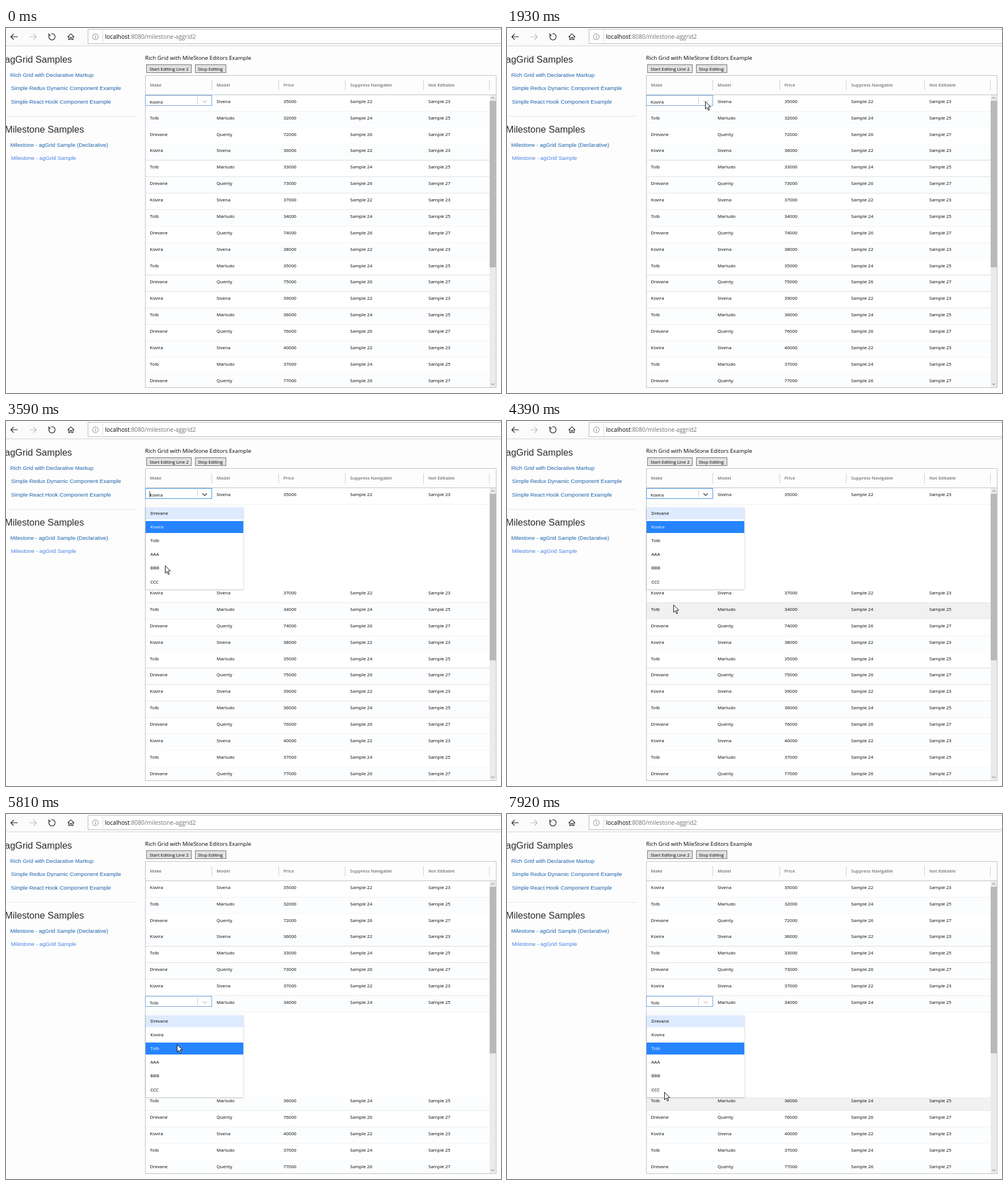
An HTML page with a canvas for the animation above (8 s loop, 872 by 642 pixels).

```html
<!DOCTYPE html>
<html lang="en">
<head>
<meta charset="utf-8">
<title>Rich Grid</title>
<style>
html, body { margin: 0; width: 100%; height: 100%; overflow: hidden; background: #fdfdfd; }
canvas { display: block; }
</style>
</head>
<body>
<canvas id="stage" width="872" height="642"></canvas>
<script>
const ctx = document.getElementById('stage').getContext('2d');
const SANS = '"Open Sans", "Noto Sans", sans-serif';
const ARIAL = '"Liberation Sans", Arial, sans-serif';
const LOOP = 8000, ROW_TOP = 117.5, ROW_H = 28.86, ROWS = 18;
const LEFT = 245, WIDTH = 607, BOTTOM = 632;

const COLUMNS = ['Make', 'Model', 'Price', 'Suppress Navigable', 'Not Editable'];
const CARS = [['Kovira', 'Sivena', 35], ['Tolb', 'Marludo', 32], ['Drevane', 'Quenty', 72]];
const OPTIONS = ['Drevane', 'Kovira', 'Tolb', 'AAA', 'BBB', 'CCC'];

// Pointer moves: start, end, target x and y
const START = [517, 557];
const MOVES = [
  [230, 610, 392, 196], [1000, 1300, 346, 180], [1300, 1850, 349, 129],
  [2480, 3270, 280, 254], [3700, 4090, 285, 270], [4090, 4240, 293, 323],
  [5180, 6040, 304, 435], [6110, 6500, 333, 412], [6500, 6900, 292, 491],
  [6950, 7300, 387, 394], [7300, 7690, 285, 493], [7800, 7900, 277, 489]
];
const OPEN = 2170, SELECT = 4470, EDIT = 4900;
const CLICKS = [2080, SELECT, 4760];
const ARROW = new Path2D('M0 0V13L3 10.3 5.2 15.3 7.2 14.5 5 9.5 9 9.2Z');
const HOME = new Path2D('M108.5 16l5.8-5.8 5.8 5.8M110.5 14.5v6h2.5v-4h2.5v4h2.5v-6');

const rowY = i => ROW_TOP + i * ROW_H;
const columnX = i => i < 4 ? 253.5 + 117.6 * i : 744;

function rect(x, y, w, h, fill) {
  ctx.fillStyle = fill;
  ctx.fillRect(x, y, w, h);
}
function box(x, y, w, h, color, fill) {
  if (fill) rect(x, y, w, h, fill);
  ctx.strokeStyle = color;
  ctx.lineWidth = 1;
  ctx.strokeRect(x + .5, y + .5, w - 1, h - 1);
}
function text(s, x, y, size = 8, color = '#000', font = SANS, weight = 400) {
  ctx.font = `${weight} ${size}px ${font}`;
  ctx.fillStyle = color;
  ctx.fillText(s, x, y);
  return x + ctx.measureText(s).width;
}
function stroke(path, color, width = 1) {
  ctx.strokeStyle = color;
  ctx.lineWidth = width;
  ctx.stroke(typeof path === 'string' ? new Path2D(path) : path);
}
function arc(x, y, r, from = 0, to = 2 * Math.PI) {
  const path = new Path2D();
  path.arc(x, y, r, from, to);
  return path;
}
function chevron(x, y, w, h, color, width = 1) {
  stroke(`M${x - w} ${y - h}l${w} ${2 * h} ${w} ${-2 * h}`, color, width);
}
// Toolbar arrow with its tip at x, pointing along dir
function arrow(x, dir, color) {
  stroke(`M${x - 12 * dir} 15.5H${x}m${-5 * dir} -5l${5 * dir} 5 ${-5 * dir} 5`, color, 1.2);
}

function toolbar() {
  rect(0, 0, 872, 31, '#fbfbfb');
  rect(0, 31, 872, 1, '#d2d2d2');
  box(144, 2, 740, 26, '#bcbcbc', '#fff');
  arrow(8.5, -1, '#222');
  arrow(53.5, 1, '#bbb');
  stroke(arc(81, 15.5, 5.5, -1.8, 3.9), '#222', 1.2);
  stroke('M75.5 9.5v3h3.5', '#222', 1.2);
  stroke(HOME, '#222', 1.1);
  stroke(arc(157.5, 15.5, 5), '#888');
  stroke('M157.5 12.5v1m0 1v4', '#888');
  rect(170, 4, 1, 22, '#dcdcdc');
  const end = text('localhost', 174.5, 19, 10.3);
  text(':8080/milestone-aggrid2', end, 19, 10.3, '#707070');
}

function sidebar() {
  const title = (s, y) => text(s, -2, y, 16.5, '#2b2b2b', ARIAL);
  const link = (s, x, y, color = '#1a62ab') => text(s, x, y, 9.7, color, ARIAL);
  title('agGrid Samples', 61);
  link('Rich Grid with Declarative Markup', 7.6, 86);
  link('Simple Redux Dynamic Component Example', 8.8, 109);
  link('Simple React Hook Component Example', 8.8, 133);
  rect(0, 155, 228, 1, '#e6e6e6');
  title('Milestone Samples', 184);
  link('Milestone - agGrid Sample (Declarative)', 7.6, 209);
  link('Milestone - agGrid Sample', 8.8, 232, '#4682e6');
}

function header() {
  text('Rich Grid with MileStone Editors Example', LEFT, 56, 9.75);
  box(247, 64, 80, 15, '#777', '#e1e1e1');
  text('Start Editing Line 2', 253, 75, 7.9);
  box(333, 64, 55, 15, '#777', '#e1e1e1');
  text('Stop Editing', 338, 75, 7.9);
  COLUMNS.forEach((s, i) => {
    text(s, columnX(i), 103, 7.8, '#707070', SANS, 600);
    rect(i < 4 ? Math.round(columnX(i + 1) - 9) : 851, 92, 1, 18, '#d0d0d0');
  });
}

function rows(hover, editing) {
  ctx.save();
  ctx.beginPath();
  ctx.rect(LEFT, 117, WIDTH, BOTTOM - 117);
  ctx.clip();
  for (let i = 0; i < ROWS; i++) {
    const y = rowY(i), k = i % 3, [make, model, price] = CARS[k];
    rect(LEFT, y, WIDTH, ROW_H, i === hover ? '#f1f1f1' : i % 2 ? '#fcfdfe' : '#fff');
    rect(LEFT, Math.floor(y + ROW_H), WIDTH, 1, '#d5d7d9');
    [i === editing ? '' : make, model, (price + Math.floor(i / 3)) * 1000,
      `Sample ${22 + 2 * k}`, `Sample ${23 + 2 * k}`]
      .forEach((s, c) => text(s, columnX(c), y + 14.4));
  }
  ctx.restore();
}

function frame() {
  rect(852, 117, 11, 515, '#ebebeb');
  rect(852, 128, 11, 293, '#b9b9b9');
  chevron(857.5, 123, 3, -1.5, '#666');
  chevron(857.5, 626.5, 3, 1.5, '#666');
  box(LEFT, 83, 619, 550, '#bdc3c7');
  rect(LEFT, 117, 618, 1, '#bdc3c7');
}

function editor(row, active, caret) {
  const y = Math.round(rowY(row));
  box(LEFT, y, 118, 19, active ? '#4793e6' : '#72a5d9', '#fff');
  rect(337, y + 3, 1, 13, '#ccc');
  chevron(350, y + 11.3, 3.8, 1.9, active ? '#555' : '#c4c4c4', active ? 1.6 : 1.2);
  text(CARS[row % 3][0], 253, y + 14.5);
  if (caret) rect(253, y + 6, 1, 10, '#222');
}

function menu(row) {
  const top = Math.round(rowY(row) + 33.3), under = Math.floor(rowY(row + 1)) + 1;
  rect(LEFT + 1, under, WIDTH - 1, top + 145 - under, '#fff');
  ctx.save();
  ctx.shadowColor = 'rgba(0,0,0,.25)';
  ctx.shadowBlur = 3;
  ctx.shadowOffsetY = 1;
  rect(246, top, 172, 145, '#fff');
  ctx.restore();
  OPTIONS.forEach((s, i) => {
    const y = top + 1 + i * 24.1, chosen = s === CARS[row % 3][0];
    if (chosen || !i) rect(246, Math.round(y), 172, 21, chosen ? '#2684ff' : '#deebff');
    text(s, 254.3, y + 13, 8, chosen ? '#fff' : '#000');
  });
}

function pointerAt(t) {
  let [x, y] = START;
  for (const [from, to, toX, toY] of MOVES) {
    const p = Math.min(1, Math.max(0, (t - from) / (to - from)));
    x += (toX - x) * p;
    y += (toY - y) * p;
  }
  return [Math.round(x), Math.round(y)];
}

function pointer(x, y, pressed) {
  if (pressed) {
    ctx.fillStyle = 'rgba(250,236,50,.75)';
    ctx.fill(arc(x, y, 12));
  }
  ctx.save();
  ctx.translate(x + .5, y + .5);
  ctx.fillStyle = '#fff';
  ctx.fill(ARROW);
  stroke(ARROW, '#111');
  ctx.restore();
}

function draw(now) {
  const t = now % LOOP;
  const [x, y] = pointerAt(t);
  const open = t >= OPEN && t < SELECT;
  const editing = t < SELECT ? 0 : t >= EDIT ? 7 : -1;
  const hover = t < 1000 ? -1 : Math.floor((y + 4 - ROW_TOP) / ROW_H);

  rect(0, 0, 872, 642, '#fdfdfd');
  toolbar();
  sidebar();
  header();
  rows(hover === editing && !open ? -1 : hover, editing);
  frame();
  if (open || editing === 7) menu(editing);
  if (editing < 0) box(LEFT, 320, 118, 29, '#2c96e0');
  else editor(editing, open, open && (t - 1420) % 1060 < 530);
  if (t >= MOVES[0][0]) pointer(x, y, CLICKS.some(c => t >= c && t < c + 90));
  requestAnimationFrame(draw);
}
requestAnimationFrame(draw);
</script>
</body>
</html>
```
